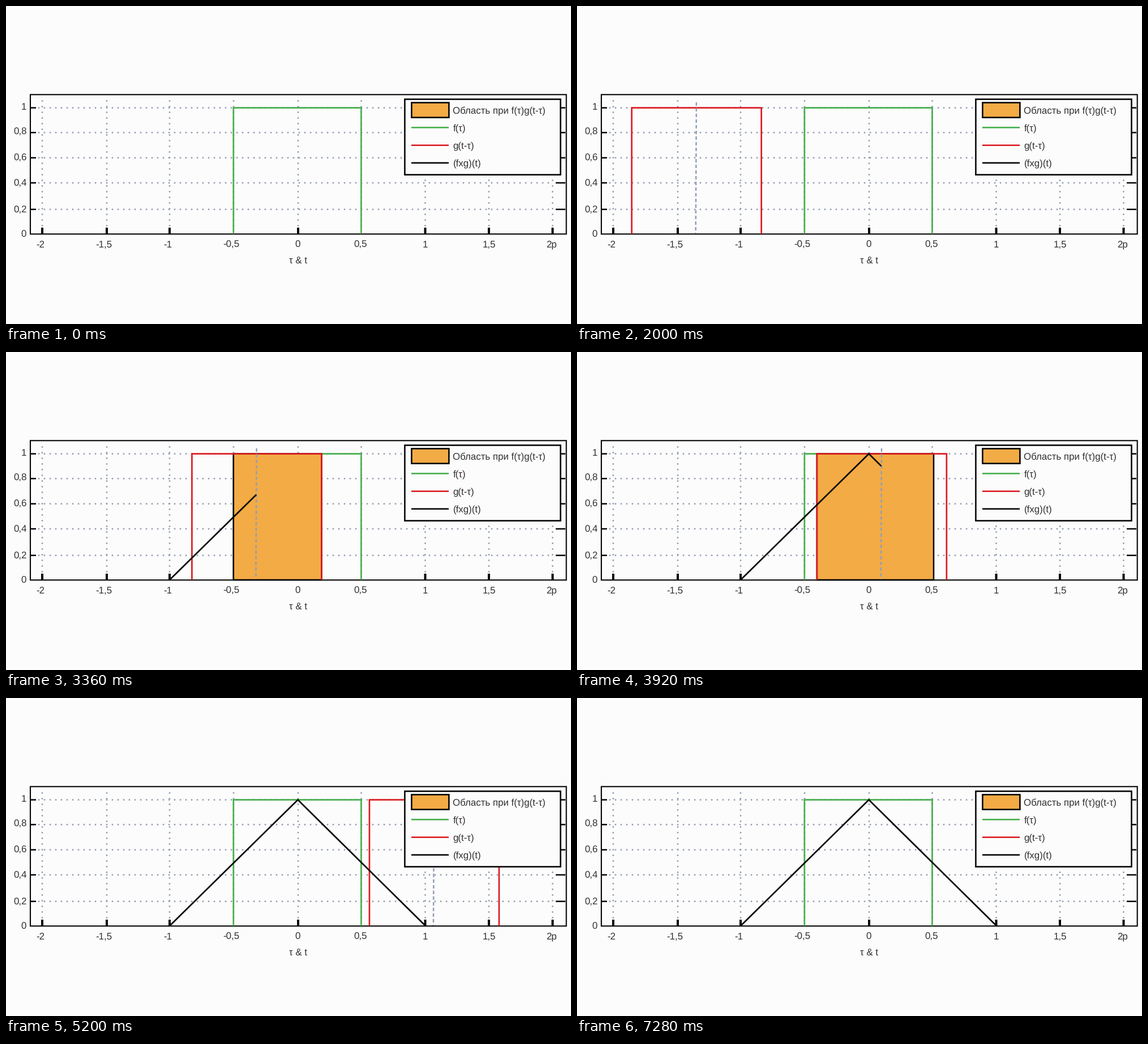
Recreate the animation shown at these times as a matplotlib script. Size 998 px wide and 561 px high, loop 8920 ms.

```python
import matplotlib.pyplot as plt
from matplotlib.animation import FuncAnimation
from matplotlib.patches import Rectangle

W, H, DPI = 998, 561, 100
PX = 72 / DPI
STEP_MS, FRAMES = 40, 223

BG, INK, TEXT = "#fcfcfc", "#050505", "#303030"
GREEN, RED, ORANGE, GRAY = "#46ae4c", "#dc1c23", "#f3ab45", "#949fb1"

BASE, TOP = 402, 179.6
PULSE_LEFT, PULSE_RIGHT = 401.8, 627.4
AREA_RIGHT = 630
PULSE_WIDTH = 229
SPEED = 0.1704  # pixels per ms
START_X = 209.8 - SPEED * 1320

plt.rcParams.update({
    "font.family": "Liberation Sans",
    "font.size": 16.9 * PX,
    "text.hinting": "none",
    "lines.scale_dashes": False,
    "lines.solid_capstyle": "butt",
    "lines.solid_joinstyle": "miter",
})

fig = plt.figure(figsize=(W / DPI, H / DPI), dpi=DPI, facecolor=BG)
ax = fig.add_axes([0, 0, 1, 1])
ax.set(xlim=(0, W), ylim=(H, 0))
ax.axis("off")


def line(xs, ys, color=INK, width=2.5, z=1, dash=None, cap="butt"):
    style = (0, [d * PX for d in dash]) if dash else "-"
    return ax.plot(xs, ys, color=color, lw=width * PX, ls=style, zorder=z,
                   dash_capstyle=cap, snap=False)[0]


def dotted(xs, ys):
    line(xs, ys, GRAY, 3, 1, (0.05, 9.95), "round")


def box(x0, y0, x1, y1, fill="none", width=2.5, z=1):
    patch = Rectangle((x0, y0), x1 - x0, y1 - y0, facecolor=fill,
                      edgecolor=INK, lw=width * PX, zorder=z, snap=False)
    return ax.add_patch(patch)


def label(x, baseline, text, align="center", z=1):
    ax.text(x, baseline, text, ha=align, va="baseline", color=TEXT, zorder=z)


def draw_axes():
    x_labels = [(64, 61, "-2"), (178, 173, "-1,5"), (289, 286, "-1"),
                (402, 397.5, "-0,5"), (516, 515.5, "0"), (627.5, 626, "0,5"),
                (740.5, 740, "1"), (853, 853, "1,5"), (965.5, 963.5, "2p")]
    for x, text_x, text in x_labels:
        dotted([x, x], [167.5, 391])
        if not text.endswith("0,5"):
            line([x, x], [391, BASE], width=4, z=2)
        label(text_x, 426, text)

    y_labels = [(179.6, 183, "1"), (223.3, 227, "0,8"), (267.8, 273, "0,6"),
                (312, 318, "0,4"), (358.8, 365, "0,2")]
    for y, baseline, text in y_labels:
        dotted([58, 968], [y, y])
        line([43, 53], [y, y], z=2)
        line([971, 988], [y, y], z=2)
        label(36.5, baseline, text, "right")
    label(36, 408, "0", "right")

    box(43, 156.3, 989.7, 402.3, width=2.1, z=2)
    label(515.5, 454, "τ & t")


def draw_legend():
    box(704.4, 164.5, 979.5, 297.7, BG, 2.6, 20)
    box(716.4, 170.5, 782.4, 196.7, ORANGE, 2.6, 21)
    label(789, 190, "Область при f(τ)g(t-τ)", "left", 21)
    rows = [(214.4, GREEN, "f(τ)"), (245.7, RED, "g(t-τ)"), (276.8, INK, "(fxg)(t)")]
    for y, color, text in rows:
        line([716, 782], [y, y], color, 2.6, 21)
        label(789.5, y + 5.6, text, "left", 21)


draw_axes()
draw_legend()
line([PULSE_LEFT] * 2 + [PULSE_RIGHT] * 2, [BASE, TOP, TOP, BASE], GREEN, 2.7, 4)

area = box(0, TOP, 0, BASE, ORANGE, 2.5, 5)
pulse = line([], [], RED, 2.7, 7)
marker = line([], [], GRAY, 2.5, 8, (6, 4))
result = line([], [], INK, 2.7, 9)

window = Rectangle((43, 150), 949, 254, transform=ax.transData)
for artist in (area, pulse, marker, result):
    artist.set_clip_path(window)

RISE_X, PEAK_X, FALL_X = 289, 515.5, 741


def convolution(x):
    if x <= PEAK_X:
        share = (x - RISE_X) / (PEAK_X - RISE_X)
    else:
        share = (FALL_X - x) / (FALL_X - PEAK_X)
    return BASE - share * (BASE - TOP)


def update(i):
    right = START_X + SPEED * i * STEP_MS
    left = right - PULSE_WIDTH
    center = right - 115.3

    pulse.set_data([left, left, right, right], [BASE, TOP, TOP, BASE])
    marker.set_data([center + 0.5, center - 0.7], [170, 401])

    x0, x1 = max(left, PULSE_LEFT), min(right, AREA_RIGHT)
    area.set_visible(x1 > x0)
    area.set_x(x0)
    area.set_width(max(x1 - x0, 0))

    end = min(center, FALL_X)
    xs = [x for x in (RISE_X, PEAK_X) if x < end]
    if xs:
        xs.append(end)
    result.set_data(xs, [convolution(x) for x in xs])
    return area, pulse, marker, result


anim = FuncAnimation(fig, update, frames=FRAMES, interval=STEP_MS,
                     init_func=lambda: update(0), repeat=True, repeat_delay=0)
plt.show()
```
